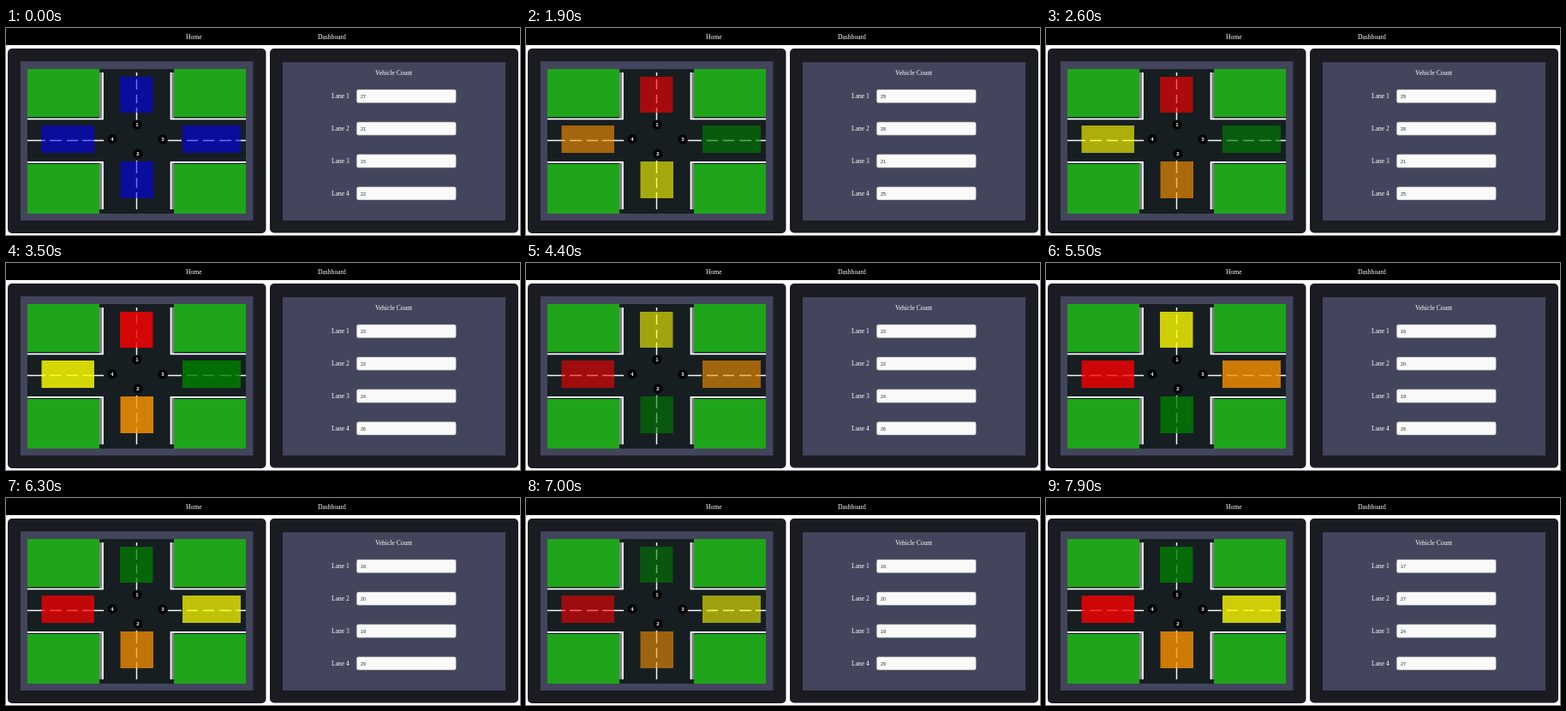
An HTML page for the animation above (8000 ms loop, 600 by 242 pixels).

```html
<!DOCTYPE html>
<html lang="en">
<head>
<meta charset="utf-8">
<title>Traffic dashboard</title>
<style>
  html, body { margin: 0; width: 100%; height: 100%; overflow: hidden; background: #fff; }
  svg { display: block; width: 600px; height: 242px; }
  text { font: 7.6px "Liberation Serif", serif; fill: #fff; }
  .sans { font: 5.3px "Liberation Sans", sans-serif; fill: #222; }
  .badge { font: bold 6px "Liberation Sans", sans-serif; text-anchor: middle; }
  .panel { fill: #1b1c22; }
  .inner { fill: #43455c; }
  .grass { fill: #1fa51a; }
  .curb, .shade, .center { fill: none; }
  .shade { stroke: #7d8285; stroke-width: 4; }
  .curb { stroke: #fff; stroke-width: 1.7; }
  .center { stroke: #f4f4f4; stroke-width: 1.5; }
</style>
</head>
<body>
<svg viewBox="0 0 600 242">
  <rect width="600" height="20"/>
  <text x="210" y="13">Home</text>
  <text x="364" y="13">Dashboard</text>
  <rect class="panel" x="2" y="24" width="301.5" height="216" rx="5"/>
  <rect class="inner" x="17" y="39" width="271.5" height="186"/>
  <rect class="panel" x="308" y="24" width="290" height="215.5" rx="5"/>
  <rect class="inner" x="323" y="40" width="260" height="185"/>
  <text x="431" y="54.5">Vehicle Count</text>

  <rect x="25" y="48" width="255" height="169" fill="#161e21"/>
  <path class="grass" d="M25 48h84v56h-84zM196 48h84v56h-84zM25 159h84v58h-84zM196 159h84v58h-84z"/>
  <path class="shade" d="M111 52V106M194 52V106M111 157V212M194 157V212"/>
  <path class="curb" d="M25 106.3H113V52M280 106.3H192.5V52M25 156.8H113V212M280 156.8H192.5V212"/>
  <path class="center" d="M25 131.5H46m5 0h14m6 0h13m5 0h25M189 131.5h16m6 0h13m6 0h13m6 0h14m5 0H280"/>
  <path class="center" d="M152.5 52v4m0 4v12m0 6v10m0 5v15M152.5 155v15m0 5v12m0 5v20"/>
  <g id="lanes"></g>
  <g id="fields"></g>
</svg>
<script>
const LOOP = 8000, TICK = 100, START = 1000, UPDATE = 2100, PULSE = 2400;
const counts = [
  [27, 21, 15, 22],
  [29, 28, 21, 25],
  [23, 22, 24, 26],
  [16, 20, 19, 29],
  [17, 27, 24, 27]
];
const ranks = ["#f00", "#ff9500", "#ff0", "green"]; // busiest lane first
const lanes = [
  { box: [133, 57, 38.5, 42], badge: [153, 113] },
  { box: [133.5, 156, 38.5, 43], badge: [154, 147] },
  { box: [206, 114, 68, 32], badge: [183, 130] },
  { box: [41.5, 114, 61.5, 32], badge: [124, 129.7] }
];

function add(parent, tag, attrs, text = "") {
  const el = document.createElementNS("http://www.w3.org/2000/svg", tag);
  for (const key in attrs) el.setAttribute(key, attrs[key]);
  el.textContent = text;
  return document.getElementById(parent).appendChild(el);
}

lanes.forEach((lane, i) => {
  const [x, y, width, height] = lane.box;
  const [cx, cy] = lane.badge;
  const mid = 79.7 + 37.9 * i;
  lane.area = add("lanes", "rect", { x, y, width, height });
  add("lanes", "circle", { cx, cy, r: 5.5 });
  add("lanes", "text", { class: "badge", x: cx, y: cy + 2.1 }, i + 1);
  add("fields", "text", { x: 380, y: mid + 2.2 }, `Lane ${i + 1}`);
  add("fields", "rect", { x: 409.3, y: mid - 7.7, width: 116, height: 15.4, rx: 2, fill: "#fafafa", stroke: "#999", "stroke-width": 0.5 });
  lane.value = add("fields", "text", { class: "sans", x: 414, y: mid + 2.1 });
});

function draw(now) {
  const t = Math.floor(now % LOOP / TICK) * TICK;
  const active = t >= START;
  const shown = active ? 1 + Math.floor((t - START) / UPDATE) : 0;
  const ranked = counts[Math.floor(t / UPDATE)]; // colours follow the counts later
  const wave = Math.cos((t - START) / PULSE * 2 * Math.PI);
  lanes.forEach((lane, i) => {
    const rank = ranked.filter(n => n > ranked[i]).length;
    lane.value.textContent = counts[shown][i];
    lane.area.setAttribute("fill", active ? ranks[rank] : "#00f");
    lane.area.setAttribute("fill-opacity", active ? 0.7 + 0.12 * wave : 0.55);
  });
  requestAnimationFrame(() => draw(performance.now()));
}
draw(performance.now());
</script>
</body>
</html>
```
